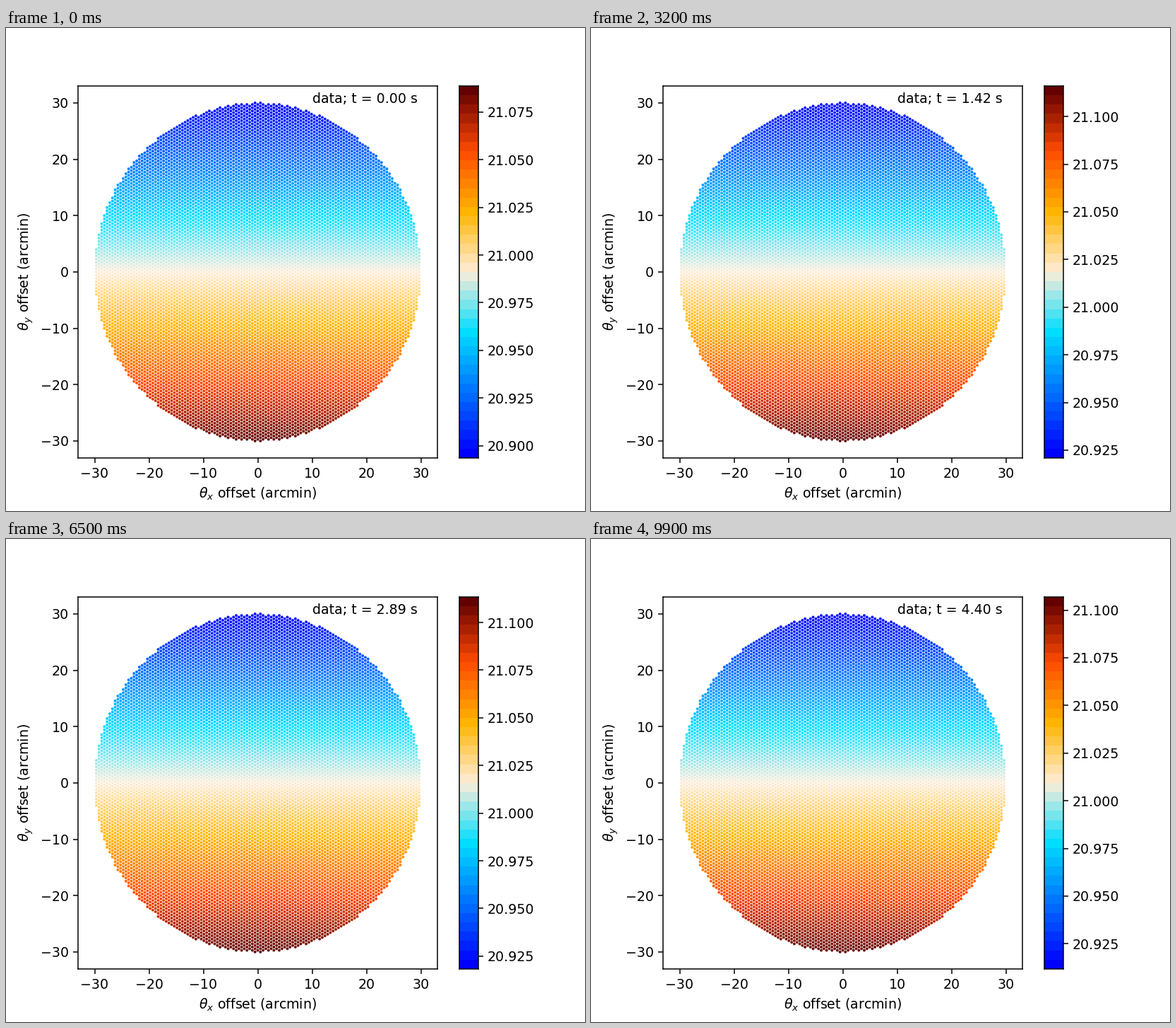
These frames come from a looping animation (820x683 px, 10000 ms). A matplotlib script:

```python
import numpy as np
import matplotlib.pyplot as plt
from matplotlib.animation import FuncAnimation
from matplotlib.colors import LinearSegmentedColormap
from matplotlib.ticker import FormatStrFormatter, MultipleLocator

W, H, DPI = 820, 683, 136.66
FRAMES, INTERVAL = 100, 100
RADIUS, PITCH = 30, 0.5713    # arcmin
SPAN, BANDS = 0.1951, 40      # value range and colour steps of the bar

# Slow drift of the highest value: a few key points, joined smoothly
KEYS = np.array([0, 8, 15, 24, 31, 41, 50, 65, 76, 82, 99])
PEAKS = np.array([21.0887, 21.0761, 21.0828, 21.1033, 21.1154, 21.1111,
                  21.1007, 21.1134, 21.1461, 21.1547, 21.1069])
SLOPES = np.gradient(PEAKS, KEYS)


def peak(i):
    """Cubic Hermite curve through the key points."""
    k = min(np.searchsorted(KEYS, i, side="right") - 1, len(KEYS) - 2)
    step = KEYS[k + 1] - KEYS[k]
    u = (i - KEYS[k]) / step
    ease = u * u * (3 - 2 * u)
    return (PEAKS[k] + ease * (PEAKS[k + 1] - PEAKS[k])
            + step * u * (1 - u) * ((1 - u) * SLOPES[k] - u * SLOPES[k + 1]))


def hex_disc(radius, pitch):
    """Hexagonal lattice with vertical columns, cut to a disc."""
    n = int(1.2 * radius / pitch) + 2
    col, row = np.meshgrid(np.arange(-n, n + 1), np.arange(-n, n + 1))
    x = col * pitch * np.sqrt(3) / 2
    y = (row + 0.5 * (col % 2)) * pitch
    inside = np.hypot(x, y) <= radius
    return x[inside], y[inside]


def axes_at(left, right):
    """Full-height plot area between two pixel columns."""
    return fig.add_axes([left / W, 0.11, (right - left) / W, 0.77])


sky = LinearSegmentedColormap.from_list("sky", np.array([
    (0, 0, 255), (0, 112, 255), (0, 221, 255), (255, 237, 217),
    (255, 180, 0), (255, 75, 0), (100, 0, 0)]) / 255)

fig = plt.figure(figsize=(W / DPI, H / DPI), dpi=DPI, facecolor="white")

ax = axes_at(102.4, 610.6)
x, y = hex_disc(RADIUS, PITCH)
ax.scatter(x, y, c=-y, cmap=sky, s=4.2, linewidths=0)
ax.set(xlim=(-33, 33), ylim=(-33, 33),
       xlabel=r"$\theta_x$ offset (arcmin)", ylabel=r"$\theta_y$ offset (arcmin)")
ax.xaxis.set_major_locator(MultipleLocator(10))
ax.yaxis.set_major_locator(MultipleLocator(10))
clock = ax.text(10, 30, "")

bar = axes_at(642.3, 668.7)
bar.pcolormesh([0, 1], np.linspace(0, 1, BANDS + 1), np.arange(BANDS)[:, None],
               cmap=sky, transform=bar.transAxes)
bar.set(xlim=(0, 1), xticks=[])
bar.yaxis.tick_right()
bar.yaxis.set_major_locator(MultipleLocator(0.025))
bar.yaxis.set_major_formatter(FormatStrFormatter("%.3f"))


def update(i):
    top = peak(i)
    bar.set_ylim(top - SPAN, top)
    clock.set_text(f"data; t = {i * 2 / 45:.2f} s")
    return clock,


anim = FuncAnimation(fig, update, frames=FRAMES, interval=INTERVAL,
                     repeat=True, repeat_delay=0, blit=False)
plt.show()
```
